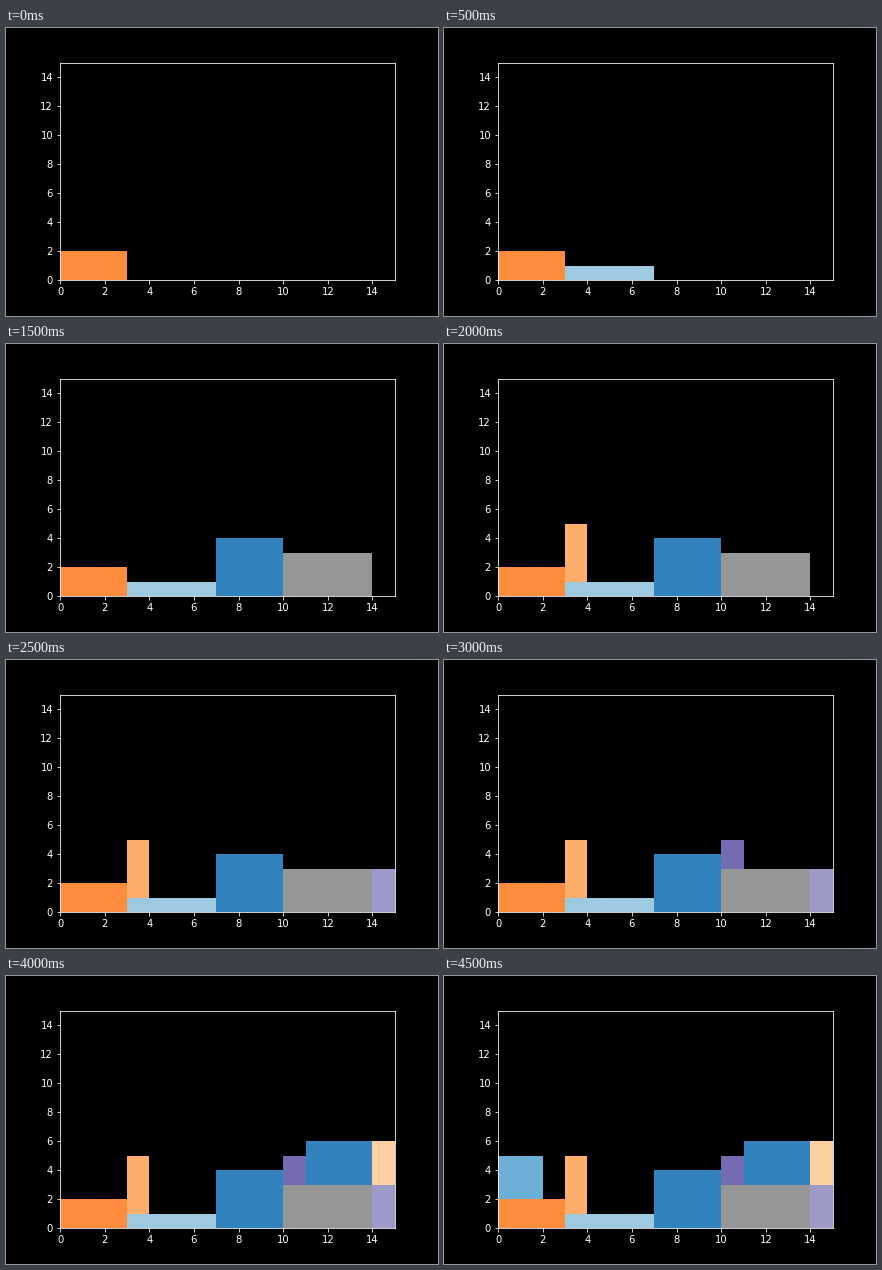
Write a matplotlib script that moves like this. It is 432x288 px and loops after 5 s.

```python
import matplotlib.pyplot as plt
from matplotlib.animation import FuncAnimation
from matplotlib.patches import Rectangle

plt.style.use("dark_background")

SIZE = 15
STEP_MS = 500

# x, y, width, height, colour: in order of placement
BLOCKS = [
    (0, 0, 3, 2, "#fd8d3c"),
    (3, 0, 4, 1, "#9ecae1"),
    (7, 0, 3, 4, "#3182bd"),
    (10, 0, 4, 3, "#969696"),
    (3, 1, 1, 4, "#fdae6b"),
    (14, 0, 1, 3, "#9e9ac8"),
    (10, 3, 1, 2, "#756bb1"),
    (11, 3, 3, 3, "#3182bd"),
    (14, 3, 1, 3, "#fdd0a2"),
    (0, 2, 2, 3, "#6baed6"),
]

fig, ax = plt.subplots(figsize=(6, 4), dpi=72)
fig.subplots_adjust(left=0.125, right=0.9, bottom=0.125, top=0.88)
ax.set_xlim(0, SIZE)
ax.set_ylim(0, SIZE)
ax.set_xticks(range(0, SIZE, 2))
ax.set_yticks(range(0, SIZE, 2))

patches = [
    ax.add_patch(Rectangle((x, y), w, h, facecolor=color, linewidth=0))
    for x, y, w, h, color in BLOCKS
]


def draw(step):
    for i, patch in enumerate(patches):
        patch.set_visible(i <= step)
    return patches


anim = FuncAnimation(
    fig,
    draw,
    frames=len(BLOCKS),
    init_func=lambda: draw(0),
    interval=STEP_MS,
    repeat=True,
    repeat_delay=0,
)

plt.show()
```
